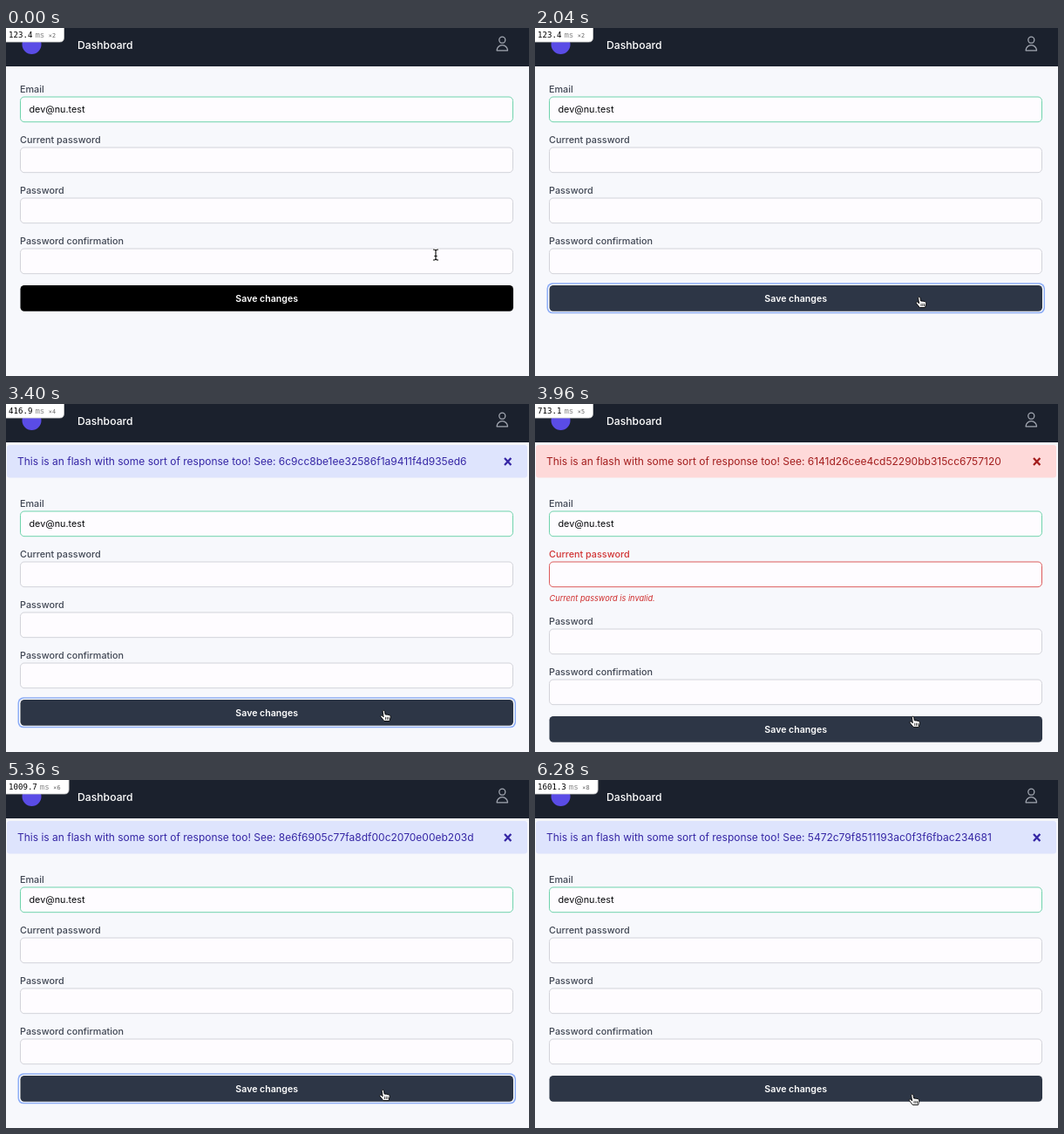
Animation of 600x399 px, one loop 6.32 s. Source, as an HTML page:

```html
<!DOCTYPE html>
<html lang="en">
<head>
<meta charset="utf-8">
<title>Dashboard form</title>
<style>
  html, body { margin: 0; width: 100%; height: 100%; overflow: hidden; background: #f7f8fc; }
  svg { display: block; width: 600px; height: 399px; font-family: Inter, "Open Sans", sans-serif; }
  .label { font-size: 10.8px; font-weight: 500; fill: #414754; }
  .box { fill: #fefcff; stroke: #d2d3d9; }
  .valid .box { stroke: #6fd3ac; }
  .value { font-size: 10.8px; fill: #08090c; }
  .invalid .label { fill: #d13434; }
  .invalid .box { stroke: #dc5a5a; }
  #error { font-size: 9.2px; font-style: italic; fill: #cf2f2f; }
  #flashText { font-size: 12px; }
  #badge { font-family: "DejaVu Sans Mono", monospace; font-size: 9.1px; }
  #badge .unit { fill: #8a8a8a; }
  #badge .count { fill: #666; font-size: 6.8px; }
</style>
</head>
<body>
<svg viewBox="0 0 600 399">
  <rect width="600" height="399" fill="#f7f8fc"/>
  <rect width="600" height="44" fill="#1b212d"/>
  <circle cx="29.5" cy="19" r="11" fill="#5a4ce6"/>
  <text x="82" y="23.5" font-size="12.2" font-weight="500" fill="#fff">Dashboard</text>
  <g fill="none" stroke="#a3a8b2" stroke-width="1.3" stroke-linejoin="round">
    <circle cx="569.3" cy="13.7" r="3.5"/>
    <path d="M563.1 25.8a6.2 6.2 0 0 1 12.4 0z"/>
  </g>

  <g id="flash">
    <rect id="flashBox" x="1" y="47" width="597" height="37.5" rx="3"/>
    <text id="flashText" x="13" y="70.4"></text>
    <path id="close" d="M572 62l7.4 8m0-8l-7.4 8" stroke-width="2.3" fill="none"/>
  </g>

  <g id="form">
    <g id="upper"></g>
    <text id="error" x="16.5" y="181.8">Current password is invalid.</text>
    <g id="lower">
      <g id="ring">
        <rect x="13.5" y="292.3" width="571.5" height="35" rx="6.5" fill="#8dadf6"/>
        <rect x="15" y="293.8" width="568.5" height="32" rx="5.5" fill="#fff"/>
      </g>
      <rect id="button" x="16.5" y="295" width="565.5" height="29.7" rx="4.5"/>
      <text x="299.2" y="313.8" font-size="10.6" font-weight="600" fill="#fff" text-anchor="middle">Save changes</text>
    </g>
  </g>

  <g id="badge">
    <path id="badgeBox" fill="#fff" stroke="#cfcfcf" stroke-width=".8"/>
    <text x="3" y="11.3"><tspan id="ms"></tspan><tspan class="unit" dx="3">ms</tspan><tspan id="count" class="count" dx="4.5"></tspan></text>
  </g>

  <g id="cursor" stroke-linejoin="round" stroke-linecap="round">
    <g id="beam" fill="none">
      <path d="M-2.6-6Q0-6 0-4.5Q0-6 2.6-6M0-4.5V4.5M-2.6 6Q0 6 0 4.5Q0 6 2.6 6M-1.2 1.5H1.2" stroke="#fff" stroke-width="2.4"/>
      <path d="M-2.6-6Q0-6 0-4.5Q0-6 2.6-6M0-4.5V4.5M-2.6 6Q0 6 0 4.5Q0 6 2.6 6M-1.2 1.5H1.2" stroke="#000" stroke-width="1.1"/>
    </g>
    <g id="hand">
      <path d="M-1.4.5C-1.6-1 .6-1.2.9.3L1.6 4 4.2 4.2 6.6 4.8C7.6 5.2 7.8 6 7.6 7.2L6.6 11.5H.3L-3.6 6.6C-4.3 5.4-2.8 4.6-1.9 5.5L-.6 6.6Z" fill="#fff" stroke="#000" stroke-width=".9"/>
      <path d="M2 7.2V9.6M3.8 7.2V9.6M5.5 7.2V9.6" stroke="#000" stroke-width=".7"/>
    </g>
    <path id="arrow" d="M0 0V11L2.5 8.7 4.2 12.6 6 11.8 4.3 8H7.7Z" fill="#000" stroke="#fff" stroke-width="1"/>
  </g>
</svg>
<script>
const LOOP = 6320, STEP = 40;
const $ = id => document.getElementById(id);
const show = (id, on) => $(id).setAttribute('visibility', on ? 'visible' : 'hidden');
const shift = (id, x, y) => $(id).setAttribute('transform', `translate(${x} ${y})`);

const themes = {
  notice: { bg: '#dee4fd', ink: '#3526a5' },
  alert: { bg: '#fed9d9', ink: '#a31d1d' }
};

// Each page lasts until the next; the button gains focus at "click".
const pages = [
  { at: 0, click: 2000, ms: '123.4', count: 2 },
  { at: 2280, click: 3360, ms: '416.9', count: 4, kind: 'notice', hash: '6c9cc8be1ee32586f1a9411f4d935ed6' },
  { at: 3720, click: 4320, ms: '713.1', count: 5, kind: 'alert', hash: '6141d26cee4cd52290bb315cc6757120' },
  { at: 4680, click: 5200, ms: '1009.7', count: 6, kind: 'notice', hash: '8e6f6905c77fa8df00c2070e00eb203d' },
  { at: 5480, click: 5840, ms: '1305.4', count: 7, kind: 'alert', hash: '2b70e4d91c8a63f5507de1b94a2c8f36' },
  { at: 6160, click: LOOP, ms: '1601.3', count: 8, kind: 'notice', hash: '5472c79f8511193ac0f3f6fbac234681' }
];

// Pointer stops: time, x, y
const stops = [
  [0, 493, 260], [640, 441, 307], [720, 441, 309], [2760, 441, 309],
  [3040, 436, 373], [3320, 433.5, 352], [3800, 433.5, 352], [4160, 434, 368.5],
  [4760, 434, 368.5], [5120, 432.5, 356], [5480, 432.5, 356], [5720, 433, 361], [LOOP, 433, 361]
];

function field(parent, label, y, state = '', value = '') {
  $(parent).insertAdjacentHTML('afterbegin', `<g class="${state}">
    <text class="label" x="16" y="${y - 4.3}">${label}</text>
    <rect class="box" x="16.5" y="${y + .5}" width="565" height="28.7" rx="4.5"/>
    <text class="value" x="26.5" y="${y + 18.7}">${value}</text></g>`);
  return $(parent).firstElementChild;
}
field('upper', 'Email', 78.5, 'valid', 'dev@nu.test');
const current = field('upper', 'Current password', 136.5);
field('lower', 'Password', 194.5);
field('lower', 'Password confirmation', 252.5);

function pointer(t) {
  const i = stops.findIndex(s => s[0] > t);
  const [t0, x0, y0] = stops[i - 1], [t1, x1, y1] = stops[i];
  const p = (t - t0) / (t1 - t0), e = p * p * (3 - 2 * p);
  return [x0 + (x1 - x0) * e, y0 + (y1 - y0) * e];
}

function setPage(page) {
  const failed = page.kind === 'alert', theme = themes[page.kind];
  show('flash', theme);
  if (theme) {
    $('flashBox').setAttribute('fill', theme.bg);
    $('flashText').setAttribute('fill', theme.ink);
    $('close').setAttribute('stroke', theme.ink);
    $('flashText').textContent = 'This is an flash with some sort of response too! See: ' + page.hash;
  }
  shift('form', 0, theme ? 44 : 0);
  shift('lower', 0, failed ? 19 : 0);
  show('error', failed);
  current.setAttribute('class', failed ? 'invalid' : '');
  $('ms').textContent = page.ms;
  $('count').textContent = '×' + page.count;
  const right = 38.5 + page.ms.length * 5.6;
  $('badgeBox').setAttribute('d', `M-1-1H${right}V11q0 5-5 5H-1z`);
}

let shown;
function draw(now) {
  const t = Math.floor(now % LOOP / STEP) * STEP;
  const page = pages.findLast(p => p.at <= t);
  if (page !== shown) setPage(shown = page);

  const [x, y] = pointer(t);
  const local = y - (page.kind ? 44 : 0) - (page.kind === 'alert' ? 19 : 0);
  const hover = local >= 295 && local <= 324.4;
  const busy = t >= 4480 && t < 4680;
  const inField = local > 252 && local < 283;
  $('button').setAttribute('fill', hover ? '#2d3646' : '#000');
  show('ring', t >= page.click);
  shift('cursor', x, y);
  show('hand', hover && !busy);
  show('beam', inField);
  show('arrow', !inField && (!hover || busy));
}

const start = performance.now();
function tick() {
  draw(performance.now() - start);
  requestAnimationFrame(tick);
}
tick();
</script>
</body>
</html>
```
